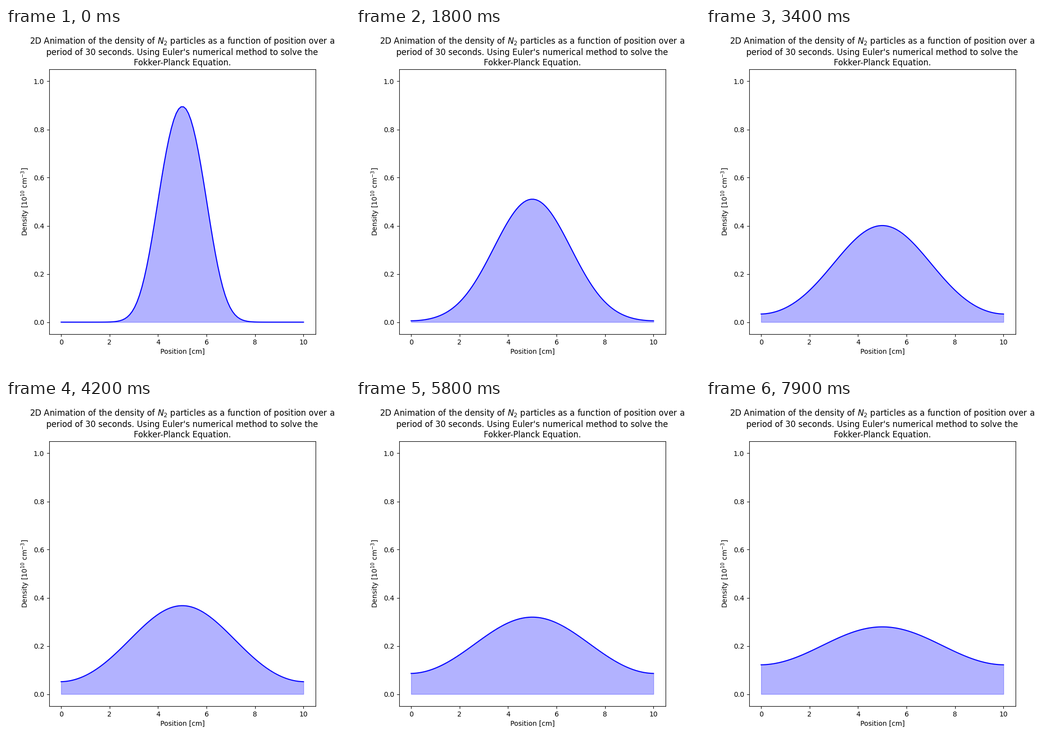
Recreate the animation shown at these times as a matplotlib script. Size 700 by 700 pixels, loop 8 s.

```python
import numpy as np
import matplotlib.pyplot as plt
from matplotlib.animation import FuncAnimation

FRAMES = 80
INTERVAL = 100   # ms
LEAD = 4         # frames of diffusion before the loop starts
SUBSTEPS = 20
D = 0.0485       # cm^2 per frame

x = np.linspace(0, 10, 100)
r = D / SUBSTEPS / (x[1] - x[0]) ** 2


def diffuse(u):
    """Advance one frame with explicit Euler steps and no-flux walls."""
    for _ in range(SUBSTEPS):
        p = np.pad(u, 1, mode="edge")
        u = u + r * (p[2:] - 2 * u + p[:-2])
    return u


density = [np.where((x > 4) & (x < 6), 1.0, 0.0)]
for _ in range(LEAD + FRAMES - 1):
    density.append(diffuse(density[-1]))
density = density[LEAD:]

fig, ax = plt.subplots(figsize=(7, 7), dpi=100)
ax.set_xlim(-0.5, 10.5)
ax.set_ylim(-0.05, 1.05)
ax.set_title(
    "2D Animation of the density of $N_2$ particles as a function of position over a\n"
    "period of 30 seconds. Using Euler's numerical method to solve the\n"
    "Fokker-Planck Equation."
)
ax.set_xlabel("Position [cm]")
ax.set_ylabel("Density [$10^{10}$ cm$^{-3}$]")

line, = ax.plot(x, density[0], color="blue")
fill = ax.fill_between(x, density[0], color="blue", alpha=0.3)


def update(i):
    u = density[i]
    line.set_ydata(u)
    outline = np.column_stack([x, u])
    fill.set_verts([np.vstack([[x[0], 0], outline, [x[-1], 0]])])
    return line, fill


anim = FuncAnimation(fig, update, frames=FRAMES, interval=INTERVAL,
                     repeat=True, repeat_delay=0)
plt.show()
```
